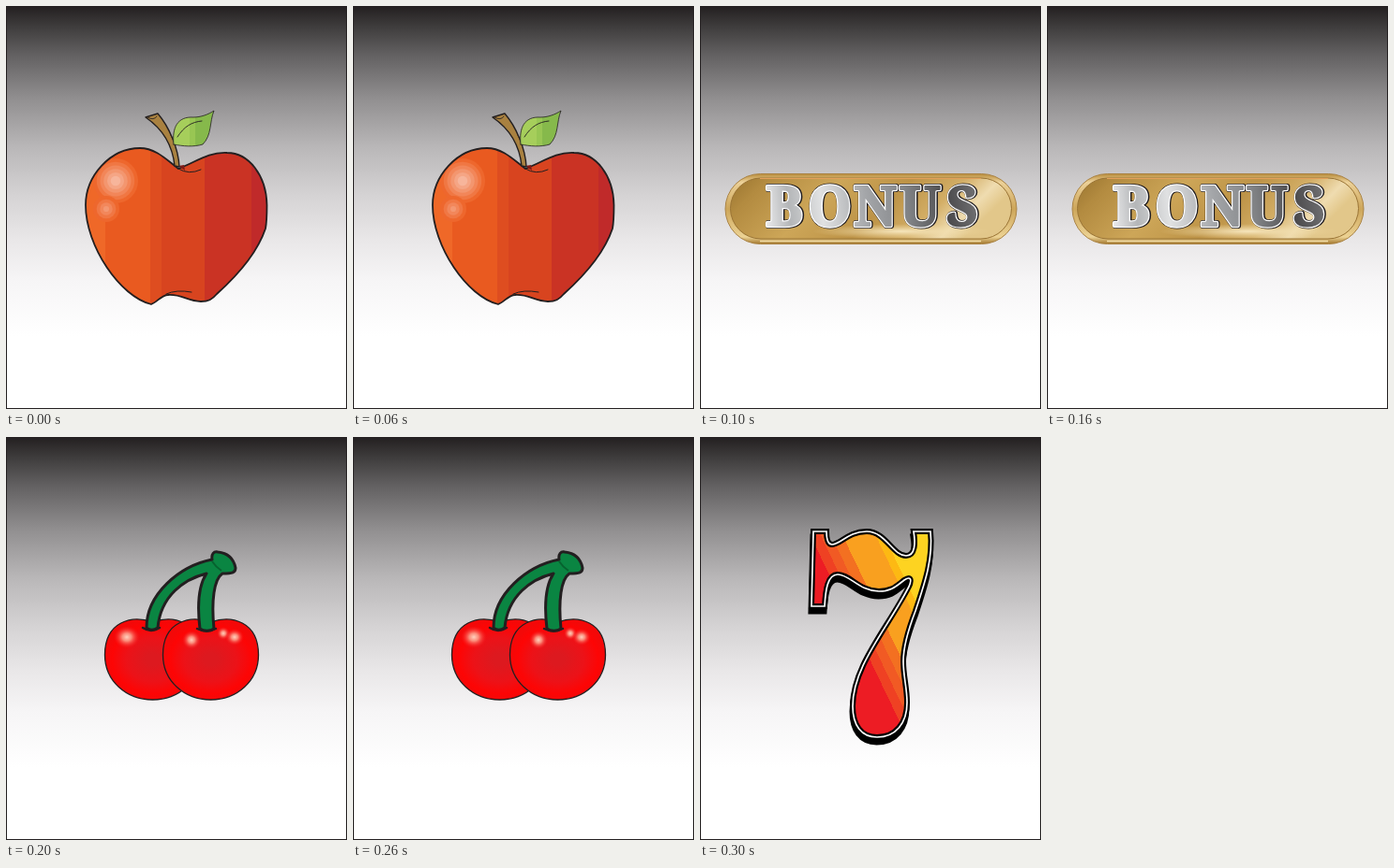
Write an HTML page that moves like this. It is 364 by 431 pixels and loops after 400 ms.

```html
<!DOCTYPE html>
<html lang="en">
<head>
<meta charset="utf-8">
<title>Slot reel</title>
<style>
  html, body { margin: 0; width: 100%; height: 100%; overflow: hidden; background: #fff; }
  svg { display: block; width: 364px; height: 431px; }
  .symbol { opacity: 0; }
  .ink { stroke: #231f20; stroke-linejoin: round; stroke-linecap: round; }
  .line { fill: none; }
  .word { font: 900 58px "Noto Serif", serif; text-anchor: middle; stroke-linejoin: round; }
</style>
</head>
<body>
<svg viewBox="0 0 364 431">
  <defs>
    <linearGradient id="sky" x2="0" y2="1">
      <stop stop-color="#231f20"/>
      <stop offset=".05" stop-color="#3e3c3c"/>
      <stop offset=".12" stop-color="#626061"/>
      <stop offset=".23" stop-color="#918f90"/>
      <stop offset=".35" stop-color="#b9b7b8"/>
      <stop offset=".47" stop-color="#d5d3d4"/>
      <stop offset=".58" stop-color="#e9e7e8"/>
      <stop offset=".68" stop-color="#f6f5f6"/>
      <stop offset=".82" stop-color="#fff"/>
    </linearGradient>
    <linearGradient id="leaf">
      <stop offset=".4" stop-color="#a6ce5b"/><stop offset=".4" stop-color="#98c653"/>
      <stop offset=".54" stop-color="#98c653"/><stop offset=".54" stop-color="#86b94b"/>
    </linearGradient>
    <linearGradient id="bark" gradientUnits="userSpaceOnUse" x1="163" y1="146" x2="182" y2="138">
      <stop offset=".7" stop-color="#a98140"/><stop offset=".7" stop-color="#86632f"/>
    </linearGradient>
    <linearGradient id="rim" x2="0" y2="1">
      <stop stop-color="#b98d3c"/><stop offset=".12" stop-color="#ecd198"/>
      <stop offset=".5" stop-color="#cda65a"/><stop offset=".9" stop-color="#ecd293"/>
      <stop offset="1" stop-color="#a1752b"/>
    </linearGradient>
    <linearGradient id="gold" x2="1" y2=".22">
      <stop stop-color="#99742f"/><stop offset=".13" stop-color="#b38b40"/>
      <stop offset=".38" stop-color="#cda658"/><stop offset=".62" stop-color="#bd9347"/>
      <stop offset=".8" stop-color="#d3ae66"/><stop offset=".92" stop-color="#efdcb0"/>
      <stop offset="1" stop-color="#e2c78a"/>
    </linearGradient>
    <radialGradient id="sheen">
      <stop stop-color="#f6e6bd"/><stop offset="1" stop-color="#f0d9a2" stop-opacity="0"/>
    </radialGradient>
    <linearGradient id="silver" gradientUnits="userSpaceOnUse" x1="68" y1="225" x2="298" y2="200">
      <stop stop-color="#eeeeef"/><stop offset=".12" stop-color="#b4b6b8"/>
      <stop offset=".27" stop-color="#e0e1e2"/><stop offset=".48" stop-color="#a3a5a8"/>
      <stop offset=".65" stop-color="#85878a"/><stop offset=".85" stop-color="#4c4b4d"/>
      <stop offset="1" stop-color="#747476"/>
    </linearGradient>
    <radialGradient id="cherry">
      <stop offset=".15" stop-color="#dd191f"/><stop offset=".55" stop-color="#ec1218"/>
      <stop offset=".85" stop-color="#fd0505"/><stop offset="1" stop-color="#f40808"/>
    </radialGradient>
    <radialGradient id="shine">
      <stop stop-color="#ffd0bd"/><stop offset=".35" stop-color="#fb8c7a"/>
      <stop offset="1" stop-color="#f5161a" stop-opacity="0"/>
    </radialGradient>
    <linearGradient id="fire" gradientUnits="userSpaceOnUse" x1="130" y1="156" x2="220" y2="113">
      <stop offset=".11" stop-color="#ed1c24"/><stop offset=".11" stop-color="#ef4123"/>
      <stop offset=".21" stop-color="#ef4123"/><stop offset=".21" stop-color="#f15a24"/>
      <stop offset=".31" stop-color="#f15a24"/><stop offset=".31" stop-color="#f37021"/>
      <stop offset=".42" stop-color="#f37021"/><stop offset=".42" stop-color="#f9a01f"/>
      <stop offset=".74" stop-color="#f9a01f"/><stop offset=".74" stop-color="#fdb913"/>
      <stop offset=".82" stop-color="#fdb913"/><stop offset=".82" stop-color="#fdd321"/>
    </linearGradient>
    <path id="appleShape" d="M184 174C172 165 160 152 143 152C111 152 85 182 85 213C85 257 122 311 155 319C161 317 166 309 173 309C188 308 194 316 208 316C216 316 220 314 225 308C245 290 268 265 277 238C278.500 230 278.500 222 278.500 213C278 181 259 157 236 157C215 156 203 167 184 174Z"/>
    <clipPath id="appleClip"><use href="#appleShape"/></clipPath>
    <path id="seven" d="M121 101H135C135 110 137 115 141 115C150 115 158 101 178 101C198 101 206 127 220 127C230 127 230 113 228 101H246C249 130 240 156 230 186C220 212 217 226 217 240C217 256 221 268 221 284C221 306 209 321 189 321C172 321 163 308 163 288C163 245 200 205 223 160C227 151 224 149 218 153C210 159 205 165 191 165C170 165 160 147 147 147C136 147 134 164 133 181H119Z"/>
  </defs>

  <rect width="364" height="431" fill="url(#sky)"/>
  <rect x=".5" y=".5" width="363" height="430" fill="none" stroke="#231f20"/>

  <g class="symbol">
    <g id="appleFill" clip-path="url(#appleClip)"></g>
    <use href="#appleShape" class="ink line" stroke-width="1.8"/>
    <path d="M184 171L190 170L191 176Z" fill="#7d1a17"/>
    <path class="ink line" d="M184 174Q195 181 208 175M171 308Q182 303 198 306"/>
    <path class="ink" fill="url(#bark)" stroke-width="1.4" d="M149 119L162 115C174 129 184 152 185 172L180 171C178 151 168 132 149 119Z"/>
    <path class="ink line" stroke-width=".8" d="M151 119Q158 123 161 118"/>
    <path class="ink" fill="url(#leaf)" stroke-width=".8" d="M179 148C177 130 183 118 200 119C208 119 216 116 222 112C217 124 220 138 210 148C200 151 189 150 179 148Z"/>
    <path class="ink line" stroke-width=".9" d="M183 140C190 129 198 124 209 123"/>
  </g>

  <g class="symbol">
    <rect x="27" y="179.500" width="311" height="75" rx="37.500" fill="url(#rim)" stroke="#a98243"/>
    <rect x="32.500" y="184" width="300" height="65" rx="32.500" fill="url(#gold)" stroke="#9a7435"/>
    <ellipse cx="215" cy="241" rx="95" ry="8" fill="url(#sheen)"/>
    <path d="M64 184.500H300" stroke="#e3a05a"/>
    <path d="M64 251.500H300" stroke="#f3dfa9" stroke-width="1.5"/>
    <g id="word" class="word"></g>
  </g>

  <g class="symbol">
    <g id="cherries"></g>
    <path class="ink" fill="#0a8542" stroke-width="3" d="M150 204C150 168 185 138 220 131C219 125 222 122 226 123C236 124 243 130 245 140C245 145 242 146 231 146C222 152 219 175 222 205C218 208 211 208 207 205C204 180 206 158 214 146C190 152 165 170 162 204C158 207 153 207 150 204Z"/>
    <path class="ink line" stroke-width="2.5" d="M146 204Q155 210 164 204M204 205Q214 210 224 205"/>
    <path class="line" stroke="#07622f" stroke-width="2" d="M220 133Q224 139 230 143"/>
  </g>

  <g class="symbol">
    <use href="#seven" y="5.500" x="-.5" stroke="#000" stroke-width="6"/>
    <use href="#seven" fill="url(#fire)" stroke="#000" stroke-width="6"/>
    <use href="#seven" fill="none" stroke="#fff" stroke-width="1.700"/>
  </g>
</svg>
<script>
  const STEP = 100;
  const SVG = 'http://www.w3.org/2000/svg';
  const add = (id, tag, attrs, text = '') => {
    const node = document.createElementNS(SVG, tag);
    for (const [key, value] of Object.entries(attrs)) node.setAttribute(key, value);
    node.textContent = text;
    document.getElementById(id).append(node);
  };

  // Apple: flat vertical bands, then stepped highlights.
  [[80, '#ef6828'], [106, '#e95a20'], [154, '#de4d20'], [166, '#d8441f'],
   [212, '#ca3324'], [262, '#c02a2a']].forEach(([x, fill]) =>
    add('appleFill', 'rect', { x, y: 145, width: 290 - x, height: 180, fill }));
  const glow = (cx, cy, radius, rings, peak) => {
    for (let i = 0; i < rings; i++) {
      const k = i / (rings - 1);
      const mix = (from, to) => Math.round(from + (to - from) * k * peak);
      add('appleFill', 'circle', {
        cx, cy, r: radius * (1 - .78 * k),
        fill: `rgb(${mix(238, 249)},${mix(103, 200)},${mix(45, 182)})`
      });
    }
  };
  glow(117, 187, 24, 6, .8);
  glow(107, 217, 14, 4, .5);

  // Lettering: dark edge, white edge, metal face.
  const layers = [
    { stroke: '#1f1c20', 'stroke-width': 6, transform: 'translate(.7 .7)' },
    { stroke: '#fff', 'stroke-width': 4.5 },
    { fill: 'url(#silver)', stroke: 'url(#silver)', 'stroke-width': 2 }
  ];
  layers.forEach(layer =>
    add('word', 'text', { x: '90 138.5 187 235 280', y: 234.5, ...layer }, 'BONUS'));

  const shine = (cx, cy, rx, ry = rx) =>
    add('cherries', 'ellipse', { cx, cy, rx, ry, fill: 'url(#shine)' });
  const cherry = cx => add('cherries', 'path', {
    class: 'ink', fill: 'url(#cherry)', 'stroke-width': 1.3,
    d: `M${cx} 198C${cx + 22} 190 ${cx + 51} 197 ${cx + 51} 233` +
       `C${cx + 51} 261 ${cx + 28} 281 ${cx} 281` +
       `C${cx - 28} 281 ${cx - 51} 261 ${cx - 51} 233` +
       `C${cx - 51} 197 ${cx - 22} 190 ${cx} 198Z`
  });
  cherry(156.5);
  shine(129, 214, 14, 12);
  cherry(218.5);
  shine(198, 217, 10);
  shine(232, 210, 7);
  shine(244, 214, 10, 9);

  const symbols = document.querySelectorAll('.symbol');
  const loop = symbols.length * STEP;
  const shown = 1 / symbols.length;
  symbols.forEach((symbol, i) => {
    const run = symbol.animate([
      { opacity: 1, offset: 0 }, { opacity: 1, offset: shown },
      { opacity: 0, offset: shown }, { opacity: 0, offset: 1 }
    ], { duration: loop, delay: i * STEP - loop, iterations: Infinity });
    run.startTime = document.timeline.currentTime;
  });
</script>
</body>
</html>
```
